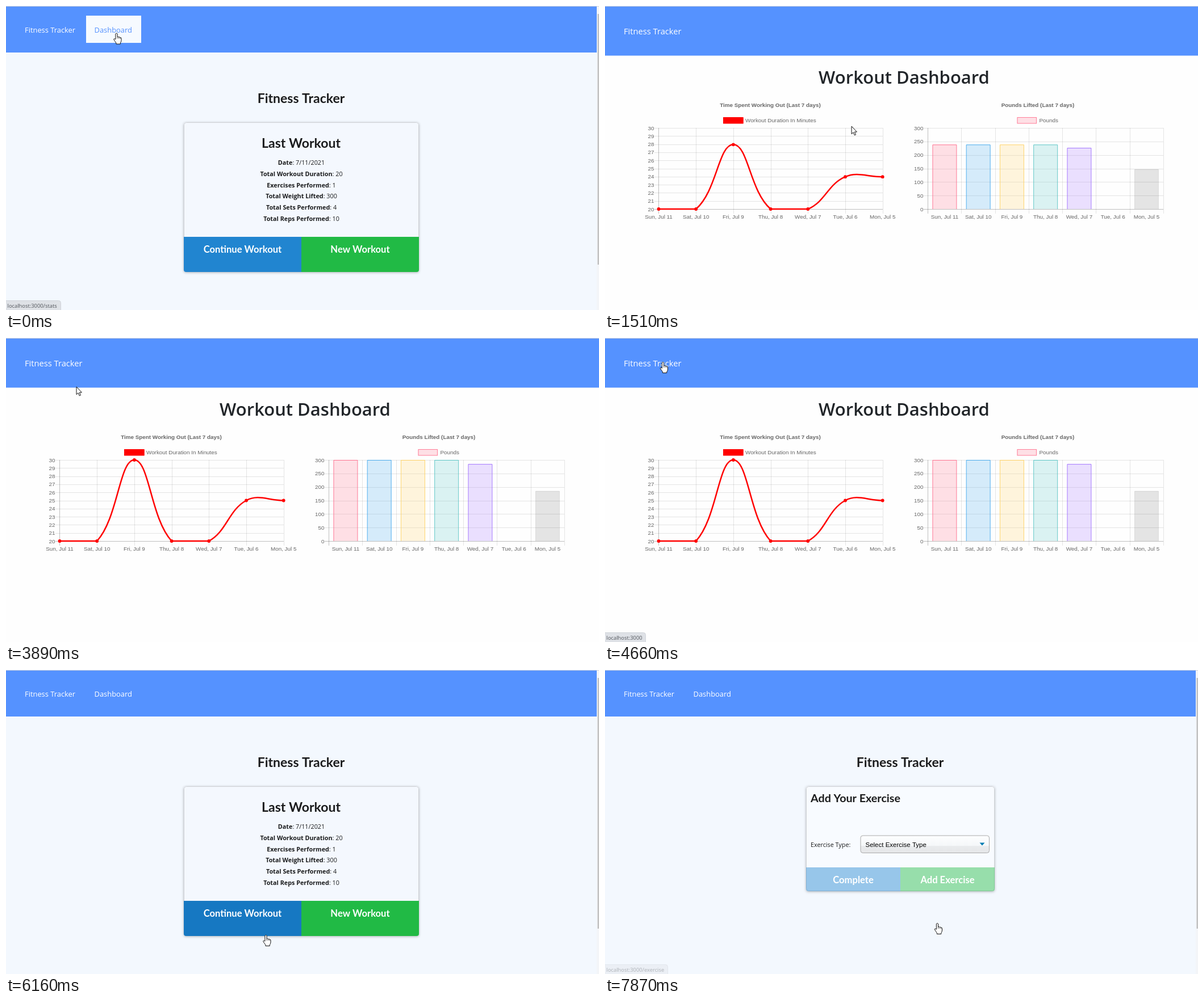
Animation, 1044 px wide and 536 px high, one loop 8000 ms. Source, as an HTML page with a canvas:

```html
<!DOCTYPE html>
<html lang="en">
<head>
<meta charset="utf-8">
<title>Fitness Tracker</title>
<style>
html, body { margin: 0; width: 100%; height: 100%; overflow: hidden; background: #fff; }
canvas { display: block; }
</style>
</head>
<body>
<canvas id="stage" width="1044" height="536"></canvas>
<script>
const ctx = document.getElementById('stage').getContext('2d');
const W = 1044, H = 536, LOOP = 8000;
const UI = '"Open Sans", "Noto Sans", sans-serif';
const HEAD = 'Lato, sans-serif';
const CHART = '"Liberation Sans", Arial, sans-serif';
const BLUE = '#5592ff', PAGE = '#f3f8fe', INK = '#212529';

// Bursts of movement: start, end, number of picture changes.
const bursts = [
  [140, 670, 5], [1100, 2050, 8], [2200, 3200, 8], [3320, 3890, 5], [3890, 4360, 4],
  [4510, 4660, 2], [5350, 6160, 7], [6160, 6310, 2], [6460, 6760, 3], [7450, 7570, 2], [7870, LOOP, 2]
];
const pointerPath = [
  [0, 194.5, 47.5], [140, 189, 49], [300, 172, 51], [450, 163, 50], [670, 171, 46.5], [1100, 171, 46.5],
  [1500, 430, 210], [1780, 590, 290], [2050, 668, 338], [2200, 720, 375], [2500, 670, 416],
  [3200, 351, 400], [3320, 335, 380], [3890, 124, 86], [4200, 107, 19], [4360, 106, 34],
  [4510, 104, 38], [4660, 102, 42], [5350, 102, 42], [5650, 170, 150], [6160, 457.5, 467],
  [6310, 548, 452], [6460, 566, 448], [6760, 585, 446]
];
const statusFade = [[1150, 1], [1400, 0], [4300, 0], [4360, .6], [4660, 1], [5370, 1],
  [5650, 0], [6450, 0], [6460, .4], [6610, 1], [7600, 1], [7870, .4]];
const tipFade = [[1900, 0], [2050, 1], [2200, .42], [2340, .1], [2480, 0]];

const days = ['Sun, Jul 11', 'Sat, Jul 10', 'Fri, Jul 9', 'Thu, Jul 8', 'Wed, Jul 7', 'Tue, Jul 6', 'Mon, Jul 5'];
const minutes = [20, 20, 30, 20, 20, 25, 25];
const pounds = [300, 300, 300, 300, 285, 0, 185];
const hues = ['255,99,132', '54,162,235', '255,206,86', '75,192,192', '153,102,255', '255,159,64'];
const TOP = 215, BASE = 358;

function stepTime(t) {
  const burst = bursts.filter(b => b[0] <= t).pop();
  if (!burst) return 0;
  const [a, b, n] = burst;
  const gap = (b - a) / (n - 1);
  return a + Math.min(n - 1, Math.floor((t - a) / gap + 1e-6)) * gap;
}

function track(keys, t, i = 1) {
  const n = keys.findIndex(k => k[0] > t);
  if (n < 0) return keys[keys.length - 1][i];
  if (n === 0) return keys[0][i];
  const a = keys[n - 1], b = keys[n];
  return a[i] + (b[i] - a[i]) * (t - a[0]) / (b[0] - a[0]);
}

function rect(x, y, w, h, color) {
  ctx.fillStyle = color;
  ctx.fillRect(x, y, w, h);
}

function line(x1, y1, x2, y2, color, width = 1) {
  ctx.strokeStyle = color;
  ctx.lineWidth = width;
  ctx.beginPath();
  ctx.moveTo(x1, y1);
  ctx.lineTo(x2, y2);
  ctx.stroke();
}

function rounded(x, y, w, h, r) {
  ctx.beginPath();
  ctx.roundRect(x, y, w, h, r);
}

// y is the middle of the capital letters
function text(str, x, y, size, family, color, align = 'left', weight = 400) {
  ctx.font = `${weight} ${size}px ${family}`;
  ctx.textAlign = align;
  ctx.fillStyle = color;
  ctx.fillText(str, x, y + size * .36);
}

function pair(label, value, y) {
  const size = 10.8, rest = ': ' + value;
  ctx.font = `700 ${size}px ${UI}`;
  const w1 = ctx.measureText(label).width;
  ctx.font = `400 ${size}px ${UI}`;
  const x = 520 - (w1 + ctx.measureText(rest).width) / 2;
  text(label, x, y, size, UI, '#1b1c1d', 'left', 700);
  text(rest, x + w1, y, size, UI, '#1b1c1d');
}

function card(x, y, w, h, fill) {
  ctx.save();
  ctx.shadowColor = 'rgba(0,0,0,.28)';
  ctx.shadowBlur = 4;
  ctx.shadowOffsetY = 1;
  ctx.fillStyle = fill;
  rounded(x, y, w, h, 4);
  ctx.fill();
  ctx.restore();
  ctx.strokeStyle = '#d0d3d7';
  ctx.lineWidth = 1;
  rounded(x + .5, y + .5, w - 1, h - 1, 4);
  ctx.stroke();
}

function buttons(x, y, w, h, textY, left, right, alpha = 1) {
  const half = w / 2;
  [[left, x, [0, 0, 0, 4]], [right, x + half, [0, 0, 4, 0]]].forEach(([b, bx, r]) => {
    ctx.globalAlpha = alpha;
    ctx.fillStyle = b.color;
    rounded(bx, y, half, h, r);
    ctx.fill();
    ctx.globalAlpha = 1;
    text(b.label, bx + half / 2, textY, 16.6, HEAD, '#fff', 'center', 700);
  });
}

function siteFrame(hoverDashboard) {
  rect(0, 0, W, H, PAGE);
  rect(0, 1, 1040, 81, BLUE);
  if (hoverDashboard) rect(141, 17, 97, 48, '#f6faff');
  text('Fitness Tracker', 33, 42, 12.9, UI, '#fff');
  text('Dashboard', 155.5, 42, 12.9, UI, hoverDashboard ? BLUE : '#fff');
  rect(1040, 1, 4, H - 1, '#f3f5f8');
  rect(1041.5, 14, 2.5, 442, '#c1c1c1');
  text('Fitness Tracker', 519.5, 163, 23, HEAD, '#1b1c1d', 'center', 700);
}

function homePage(t) {
  siteFrame(t < 1100);
  const loaded = t < 1100 || t > 5450;
  const y = loaded ? 407 : 281;
  card(313, 205, 414, y + 62 - 205, '#f4f8fe');
  text('Last Workout', 519.5, 242, 23, HEAD, '#1b1c1d', 'center', 700);
  if (loaded) {
    const rows = [['Date', '7/11/2021'], ['Total Workout Duration', 20], ['Exercises Performed', 1],
      ['Total Weight Lifted', 300], ['Total Sets Performed', 4], ['Total Reps Performed', 10]];
    rows.forEach(([label, value], i) => pair(label, value, 276 + i * 19.85));
  }
  const onLeft = t > 6100 && t < 6300, onRight = t > 6300;
  buttons(313, y, 414, 62, y + 22,
    { label: 'Continue Workout', color: onLeft ? '#1678c2' : '#2185d0' },
    { label: 'New Workout', color: onRight ? '#16ab39' : '#21ba45' });
}

function exercisePage(t) {
  siteFrame(false);
  card(354, 205, 332, 185, '#f8fbff');
  text('Add Your Exercise', 362, 226, 19.7, HEAD, '#1b1c1d', 'left', 700);
  text('Exercise Type:', 362, 308, 10.8, UI, '#1b1c1d');
  const shade = ctx.createLinearGradient(0, 292, 0, 323);
  [[0, '#fdfeff'], [.58, '#f5f7f9'], [.6, '#e9ebed'], [1, '#e5e6e8']].forEach(s => shade.addColorStop(...s));
  ctx.fillStyle = shade;
  ctx.strokeStyle = '#aaa';
  ctx.lineWidth = 1;
  rounded(450, 292, 226.5, 30.5, 4);
  ctx.fill();
  ctx.stroke();
  text('Select Exercise Type', 458.5, 307.5, 11.5, CHART, '#000');
  ctx.fillStyle = '#007cb2';
  ctx.beginPath();
  ctx.moveTo(659.5, 304.5);
  ctx.lineTo(668.5, 304.5);
  ctx.lineTo(664, 309.5);
  ctx.fill();
  buttons(354, 348, 332, 42, 370,
    { label: 'Complete', color: '#2185d0' }, { label: 'Add Exercise', color: '#21ba45' }, t < 7550 ? .6 : .45);
}

function label(str, x, y, align, weight, color = '#666') {
  text(str, x, y, 9.87, CHART, color, align, weight);
}

function grid(x0, x1, cols, rows, yLabel) {
  const faint = 'rgba(0,0,0,.1)', edge = 'rgba(0,0,0,.25)';
  for (let i = 0; i <= cols; i++) {
    const x = Math.round(x0 + (x1 - x0) * i / cols) + .5;
    line(x, TOP, x, BASE + 8, i ? faint : edge);
  }
  for (let i = 0; i <= rows; i++) {
    const v = BASE - (BASE - TOP) * i / rows, y = Math.round(v) + .5;
    line(x0 - 7, y, x1, y, i ? faint : edge);
    label(yLabel(i), x0 - 7.5, v, 'right');
  }
}

function legend(x, w, textX, str, fill, stroke) {
  rect(x, 196.5, w, 10.5, fill);
  ctx.strokeStyle = stroke;
  ctx.lineWidth = 1;
  ctx.strokeRect(x + .5, 196.5, w - 1, 10.5);
  label(str, textX, 201.5);
}

function lineChart(grow) {
  label('Time Spent Working Out (Last 7 days)', 291, 174, 'center', 700);
  legend(208, 35.5, 247, 'Workout Duration In Minutes', '#f00', '#f00');
  grid(94, 489, 6, 10, i => 20 + i);
  const pts = minutes.map((m, i) => ({ x: 94.5 + i * 65.7, y: BASE - (m - 20) * 14.3 }));
  const cap = y => Math.max(TOP, Math.min(BASE, y));
  const rise = y => BASE + (y - BASE) * grow;
  const handles = pts.map((p, i) => {
    const a = pts[i - 1] || p, b = pts[i + 1] || p;
    const d1 = Math.hypot(p.x - a.x, p.y - a.y), d2 = Math.hypot(b.x - p.x, b.y - p.y);
    const k1 = .4 * d1 / (d1 + d2), k2 = .4 * d2 / (d1 + d2);
    return [p.x - k1 * (b.x - a.x), cap(p.y - k1 * (b.y - a.y)),
            p.x + k2 * (b.x - a.x), cap(p.y + k2 * (b.y - a.y))];
  });
  ctx.strokeStyle = ctx.fillStyle = '#f00';
  ctx.lineWidth = 2.5;
  ctx.beginPath();
  pts.forEach((p, i) => {
    if (!i) return ctx.moveTo(p.x, rise(p.y));
    const from = handles[i - 1], to = handles[i];
    ctx.bezierCurveTo(from[2], rise(from[3]), to[0], rise(to[1]), p.x, rise(p.y));
  });
  ctx.stroke();
  pts.forEach((p, i) => {
    ctx.fillStyle = '#f00';
    ctx.beginPath();
    ctx.arc(p.x, rise(p.y), 2.9, 0, Math.PI * 2);
    ctx.fill();
    label(days[i], p.x, 371.5, 'center');
  });
}

function barChart(grow, hover) {
  label('Pounds Lifted (Last 7 days)', 762, 174, 'center', 700);
  legend(725.5, 34.5, 764.5, 'Pounds', 'rgba(255,99,132,.2)', 'rgba(255,99,132,.8)');
  grid(568, 983, 7, 6, i => i * 50);
  pounds.forEach((v, i) => {
    const mid = 568.3 + (i + .5) * 59.25, x = mid - 21, h = v / 300 * (BASE - TOP) * grow;
    label(days[i], mid, 371.5, 'center');
    if (!v) return;
    const hue = hues[i];
    const fill = hover && i === 1 ? 'rgba(38,151,255,.2)' : hue ? `rgba(${hue},.2)` : 'rgba(0,0,0,.1)';
    rect(x, BASE - h, 42, h, fill);
    ctx.strokeStyle = hue ? `rgb(${hue})` : 'rgba(0,0,0,.1)';
    ctx.lineWidth = .85;
    ctx.beginPath();
    ctx.moveTo(x, BASE);
    ctx.lineTo(x, BASE - h + .5);
    ctx.lineTo(x + 42, BASE - h + .5);
    ctx.lineTo(x + 42, BASE);
    ctx.stroke();
  });
}

function tooltip(alpha) {
  if (!alpha) return;
  ctx.save();
  ctx.globalAlpha = alpha;
  ctx.fillStyle = 'rgba(0,0,0,.8)';
  rounded(663, 198, 77.5, 34.5, 5);
  ctx.moveTo(663, 211);
  ctx.lineTo(659, 215);
  ctx.lineTo(663, 219);
  ctx.fill();
  label('Sat, Jul 10', 668.5, 207.5, 'left', 700, '#fff');
  rect(668, 217.5, 10, 10, '#fff');
  rect(669, 218.5, 8, 8, '#d7ecfb');
  label('Pounds: 300', 680, 222.5, 'left', 400, '#fff');
  ctx.restore();
}

function dashboard(t) {
  rect(0, 0, W, H, '#fefefe');
  rect(0, 1, W, 86.5, BLUE);
  text('Fitness Tracker', 33, 45, 14.7, UI, '#fff');
  text('Workout Dashboard', 526.5, 125.5, 31, UI, INK, 'center', 600);
  if (t < 1200) return;
  const p = Math.min(1, (t - 1180) / 1000), grow = 1 - (1 - p) ** 4;
  lineChart(grow);
  barChart(grow, t > 1900 && t < 2300);
  tooltip(track(tipFade, t));
}

function statusBar(t) {
  const alpha = track(statusFade, t);
  if (!alpha) return;
  const [str, w] = t < 2000 ? ['localhost:3000/stats', 97]
    : t < 6000 ? ['localhost:3000', 72] : ['localhost:3000/exercise', 111];
  ctx.globalAlpha = alpha;
  ctx.fillStyle = '#dee1e6';
  ctx.strokeStyle = '#cfd3d9';
  ctx.lineWidth = 1;
  rounded(-2, 519.5, w + 1.5, 20, [0, 4, 0, 0]);
  ctx.fill();
  ctx.stroke();
  text(str, 2.6, 528.5, 9.35, UI, '#50545a');
  ctx.globalAlpha = 1;
}

const arrow = new Path2D('M0 0V13.6L3.1 10.8L5.2 15.8L7.4 14.9L5.3 10H9.4Z');
const hand = new Path2D('M-1.6 1.6Q0 -1 1.6 1.6V7Q3.5 5.7 4.2 7.5Q6 6.4 6.6 8.3Q8.4 7.5 8.5 9.7V13Q8.3 16 6.8 17.5V19.5H-.6V17.5Q-3 14.5 -4.8 11.3Q-4.6 9.2 -1.6 11.2Z');
const knuckles = new Path2D('M1.6 7V10M4.2 7.5V10.2M6.6 8.3V10.4');

function pointer(t) {
  const pointing = t < 1200 || (t > 4280 && t < 5480) || t > 6100;
  ctx.save();
  ctx.translate(track(pointerPath, t, 1), track(pointerPath, t, 2));
  ctx.lineJoin = 'round';
  ctx.lineWidth = 1;
  ctx.fillStyle = '#fff';
  ctx.strokeStyle = '#111';
  const shape = pointing ? hand : arrow;
  ctx.fill(shape);
  ctx.stroke(shape);
  if (pointing) {
    ctx.lineWidth = .7;
    ctx.stroke(knuckles);
  }
  ctx.restore();
}

function draw(now) {
  const t = stepTime(now % LOOP);
  if (t >= 1100 && t < 5350) dashboard(t);
  else if (t >= 7450) exercisePage(t);
  else homePage(t);
  rect(0, 0, W, 1, '#cfd4de');
  statusBar(t);
  pointer(t);
}

let start;
function frame(now) {
  start ??= now;
  draw(now - start);
  requestAnimationFrame(frame);
}
draw(0);
requestAnimationFrame(frame);
</script>
</body>
</html>
```
